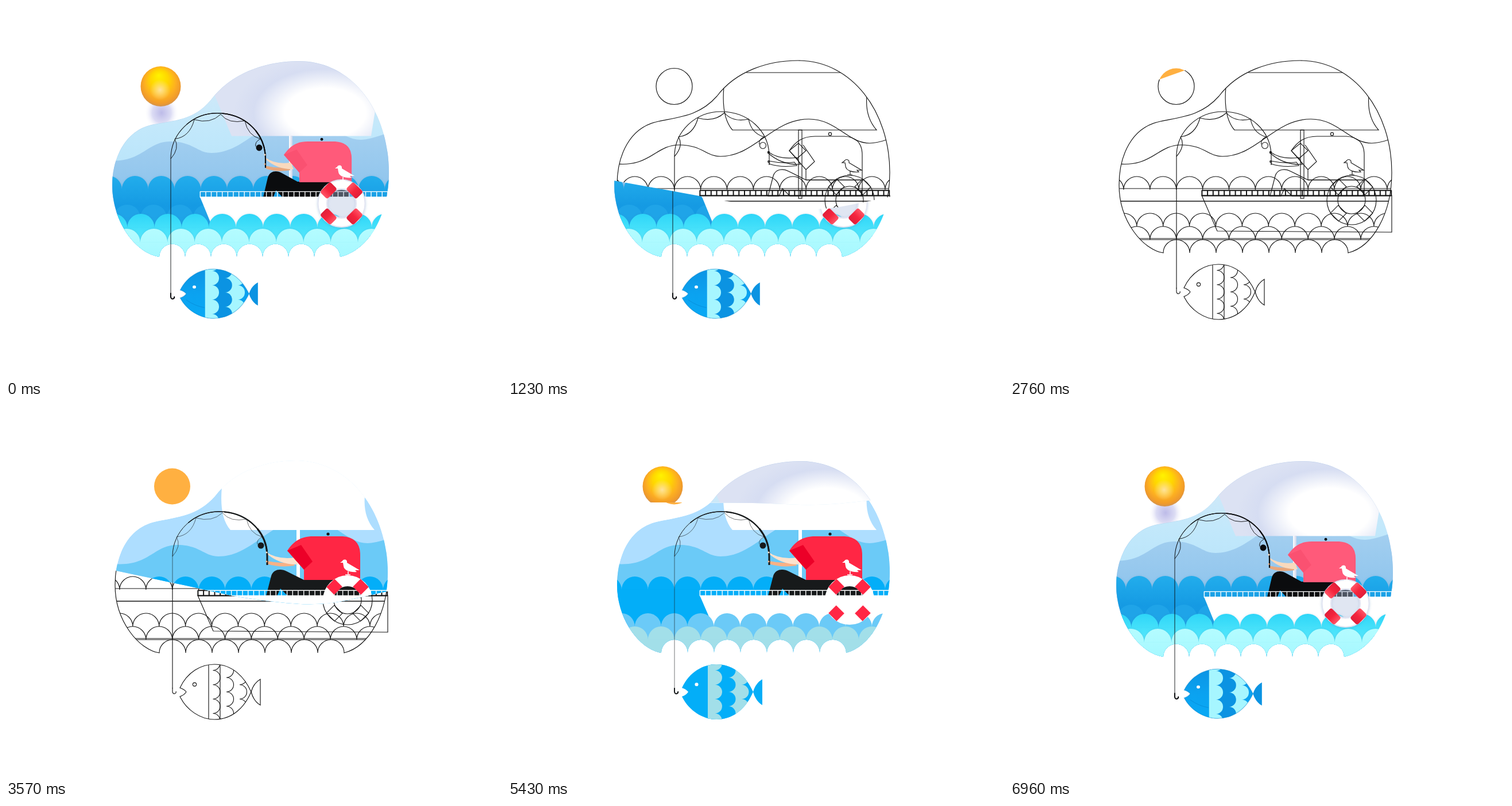
These frames come from a looping animation (864x648 px, 7200 ms). An HTML page:

```html
<!DOCTYPE html>
<html lang="en">
<head>
<meta charset="utf-8">
<title>Fishing trip</title>
<style>
  html, body { margin: 0; width: 100%; height: 100%; overflow: hidden; background: #fff; }
  svg { display: block; width: 864px; height: 648px; }
  .sketch { display: none; }
  .line * { fill: none; stroke: #151515; stroke-width: 1.15; stroke-dasharray: none; }
  .line .solid { display: none; }
  .line .sketch { display: inline; }
  .line .rail { stroke-width: 2; }
</style>
</head>
<body>
<svg id="stage" viewBox="0 0 864 648" xmlns="http://www.w3.org/2000/svg"></svg>
<script>
const LOOP = 7200;
const path = (d, fill, extra = '') => `<path d="${d}" fill="${fill}" ${extra}/>`;
const stroke = (d, color, width, extra = '') =>
  path(d, 'none', `stroke="${color}" stroke-width="${width}" ${extra}`);
const circle = (x, y, r, fill, extra = '') =>
  `<circle cx="${x}" cy="${y}" r="${r}" fill="${fill}" ${extra}/>`;
const group = (content, extra = '') => `<g ${extra}>${content}</g>`;
const matrix = m => m ? `transform="matrix(${m})"` : '';
const repeat = (n, f) => Array.from({ length: n }, (_, i) => f(i)).join('');
const gradient = (id, stops, attrs = 'x1="0" y1="0" x2="0" y2="1"', kind = 'linear') =>
  `<${kind}Gradient id="${id}" ${attrs}>` +
  stops.map(([at, color]) => `<stop offset="${at}" stop-color="${color}"/>`).join('') +
  `</${kind}Gradient>`;
const between = (y1, y2) => `gradientUnits="userSpaceOnUse" x1="0" y1="${y1}" x2="0" y2="${y2}"`;

const flat = {
  id: 'flat',
  blob: 'M267,430C232,425 190,375 190,312C190,260 212,211 262,201C300,193 334,191 364,157' +
    'C398,112 455,95 505,95C600,95 665,185 665,290C665,362 632,419 589,430' + 'a23,23 0 0 0 -46,0'.repeat(7) + 'Z',
  sky: '#aedeff', haze: '#6bcaf7',
  rows: [[152, 45.9, 297, '#03aef8'], [129, 45.9, 361, '#6bcaf7'], [152, 45.9, 384, '#a2dfe9']],
  sail: 'M376,141C373,175 377,200 391,216H642C628,200 623,180 625,157V80H376Z',
  sailFill: '#fff', mast: [506, 216, 6, 119, '#fff'],
  sun: [289.5, 140, 31.5, '#ffb041'],
  shirt: '#ff2644', sleeve: '#ec0028', ink: '#171a1b', skin: '#fde2cd', skinDark: '#f9b185',
  buoy: [595, 338, 43, 24, 20, '#ff2644'],
  fish: '#03aef8', fishScale: '#03aef8', paleScale: '#a2dfe9',
  rodWidth: 2.9, threadWidth: .6,
  at: {}
};

const depth = {
  id: 'depth',
  blob: 'M267,437C225,430 185,375 185,312C185,262 210,214 258,206C302,198 332,197 362,157' +
    'C400,112 460,96 510,96C605,96 667,185 667,290C667,365 632,425 582,437' + 'a22.5,22.5 0 0 0 -45,0'.repeat(7) + 'Z',
  sky: 'url(#air)', haze: 'url(#mist)',
  rows: [[156, 45.8, 296, 'url(#deep)'], [164, 47.3, 362, 'url(#mid)'], [139, 47.4, 388, 'url(#foam)']],
  sail: 'M362,152L393,226.5H636L644,176V80H362Z',
  sailFill: 'url(#cloth)', mast: [493, 226, 6, 102, 'url(#pole)'],
  sun: [269.5, 140, 35, 'url(#ball)'],
  shirt: '#ff5a7a', sleeve: '#fa5171', ink: '#0b0c0e', skin: '#f9d9bd', skinDark: '#e9a77c',
  buoy: [584.5, 344, 42, 24, 25, 'url(#band)'],
  fish: 'url(#fin)', fishScale: '#0b93e2', paleScale: '#a6f6ff',
  rodWidth: 2.2, threadWidth: .9,
  soft: 'style="filter:drop-shadow(0 1px 2px #3a78b044)"',
  at: {
    haze: '1 0 0 1 -12 -6', body: '.93 0 0 .934 28.3 24', legs: '.909 0 0 1 36 3',
    arms: '.9 0 0 .95 43 22', rod: '1 0 0 1.02 -3 -1', boat: '.99 0 0 1.05 7.3 -14',
    bird: '1 0 0 1 -9 10', fish: '.968 0 0 .896 10 55', scales: '1 0 0 1.116 0 -60.3'
  }
};

const defs = gradient('air', [[0, '#d8e9f7'], [.35, '#c2e8fb'], [1, '#a5dcf9']]) +
  gradient('mist', [[0, '#a9d2f1'], [1, '#8cc3ec']]) +
  gradient('deep', [[0, '#22adec'], [.5, '#159ae3'], [1, '#1a9ce4']], between(296, 400)) +
  gradient('mid', [[0, '#2ed6f8'], [1, '#5aeafc']], between(362, 410)) +
  gradient('foam', [[0, '#b4fcff'], [1, '#a6f8ff']], between(388, 436)) +
  gradient('pole', [[0, '#fff'], [1, '#ccd4ea']], '') +
  gradient('band', [[0, '#ff5567'], [.5, '#f5253d'], [1, '#e01f3a']]) +
  gradient('fin', [[0, '#0b94e4'], [.5, '#0ba2f0'], [1, '#08a9f5']]) +
  gradient('cloth', [[0, '#fff'], [.44, '#fff'], [.78, '#d6ddf2'], [1, '#dce2f3']],
    'gradientUnits="userSpaceOnUse" cx="0" cy="0" r="1" gradientTransform="translate(556 186) scale(160 98)"', 'radial') +
  gradient('ball', [[0, '#fff200'], [.4, '#ffd600'], [.7, '#fdb020'], [.9, '#f09a2b'], [1, '#cf9353']],
    'cx=".5" cy=".46" r=".55" fx=".45" fy=".22"', 'radial') +
  gradient('glow', [[0, '#ffe29c'], [1, '#ffe29c00']], '', 'radial') +
  gradient('shade', [[0, '#bdbbe8'], [.55, '#dcdcf4'], [1, '#ffffff00']], '', 'radial');

function waveRow([x, pitch, top, fill]) {
  const r = pitch / 2;
  return path(`M${x},${top + r}` + `a${r},${r} 0 0 1 ${pitch},0`.repeat(12), fill) +
    `<rect class="solid" x="${x}" y="${top + r - .5}" width="${pitch * 12}" height="120" fill="${fill}"/>`;
}

function sun(g) {
  const [x, y, r, fill] = g.sun;
  const ball = circle(x, y, r, fill);
  if (g !== depth) return ball;
  return '<ellipse cx="271" cy="186" rx="30" ry="32" fill="url(#shade)"/>' + ball +
    circle(x - 1, y + 6, 18, 'url(#glow)');
}

function angler(g) {
  const legs = path('M453,331L462,296C466,283 480,283 489,288L519,303H617V331H491L478,318L472,331Z', g.ink);
  const body = path('M519,303V285L490,252C501,236 513,227 535,227H586Q617,229 617,259V303Z', g.shirt) +
    path('M490,252L514,242L534,271L519,285Z', g.sleeve, 'class="solid"') +
    path('M506,239L490,252L503,266L519,252ZM514,242L534,271L519,285', 'none', 'class="sketch"') +
    circle(561, 223, 2.6, g.ink);
  const arms = path('M455,270Q478,275 499,272L503,278Q476,282 455,275Z', g.skinDark) +
    path('M453,254Q472,268 503,264L509,276Q476,277 453,256Z', g.skin);
  return group(legs, matrix(g.at.legs)) + group(arms, matrix(g.at.arms)) + group(body, matrix(g.at.body));
}

function rod(g) {
  const bend = 'M290,262C290,219 326,184 371,184C419,184 455,218 455,262V277';
  const taper = (from, share) => stroke(bend, g.ink, g.rodWidth * share,
    `class="solid" pathLength="100" stroke-dasharray="0 ${from} 100"`);
  const loops = 'M290,262Q306,244 297,228Q323,225 331,195Q359,203 377,186Q391,203 419,197Q424,222 446,228Q436,233 438,241';
  return group(stroke(bend, g.ink, 1) + taper(25, .55) + taper(50, .77) + taper(75, 1) +
    stroke(loops, g.ink, g.threadWidth) + stroke('M290,262V492', g.ink, g.threadWidth) +
    stroke('M290,491V498Q291,502 294,501Q297,500 296,497', g.ink, 2) +
    circle(444, 243, 5.5, g.ink) +
    circle(454, 255, 1.6, g.skin) + circle(454, 271, 1.4, g.skinDark), matrix(g.at.rod));
}

function boat(g) {
  const rail = 'M334,321.3H664.5M334,330.5H664.5' + repeat(35, i => `M${334.4 + i * 9.7},321V331`);
  return group(path('M334,330H665V394L361,392Z', '#fff') +
    stroke(rail, '#fff', 1.4, 'class="rail"'), matrix(g.at.boat));
}

function buoy(g) {
  const [x, y, outer, inner, band, fill] = g.buoy;
  const width = outer - inner;
  const ring = circle(0, 0, (outer + inner) / 2, 'none', `class="solid" stroke="#fff" stroke-width="${width}"`);
  const bands = repeat(4, i => `<rect x="${inner - 1}" y="${-band / 2}" width="${width}" height="${band}"
    rx="${g === depth ? 4 : 0}" fill="${fill}" transform="rotate(${45 + 90 * i})"/>`);
  const rims = circle(0, 0, outer, 'none', 'class="sketch"') + circle(0, 0, inner, 'none', 'class="sketch"');
  const hole = g === depth ? circle(0, 0, inner, '#c9cde8', 'fill-opacity=".35"') : '';
  const edge = g === depth
    ? circle(0, 0, inner + 1, 'none', 'stroke="#c6cce6" stroke-width="3" stroke-opacity=".5"') +
      circle(0, 0, outer - 1, 'none', 'stroke="#c6cce6" stroke-width="2" stroke-opacity=".5"') : '';
  return group(hole + ring + edge + bands + rims, `transform="translate(${x} ${y})" ${g.soft || ''}`);
}

const bird = g => group(
  path('M582,273L586,270C588,266 595,267 594,273L616,286L608,286L611,289C600,290 589,287 588,279L587,273Z', '#fff') +
  stroke('M596,288V294M591,294H600', '#fff', 1.5), matrix(g.at.bird));

const fishOutline = 'M303,491C316,463 340,450 363,450C395,450 416,473 427,498C416,524 395,546 363,546' +
  'C338,546 314,529 303,506Q310,504 314,498Q310,493 303,491Z';

function fish(g) {
  const column = (x, y, fill) => path(`M348,${y}H${x}` + 'a12.5,12.5 0 0 1 0,25'.repeat(5) + 'H348', fill);
  const scales = column(407, 435.5, g.paleScale) + column(384, 423, g.fishScale) + column(360.5, 435.5, g.paleScale);
  const rim = g === depth ? stroke('M314,510Q330,522 347,525', '#0785d0', .7) +
    stroke(fishOutline, '#0878bd', 1.5, 'stroke-opacity=".3"') : '';
  return group(path(fishOutline, g.fish) +
    group(group(scales, matrix(g.at.scales)), 'clip-path="url(#fishClip)"') +
    path('M353,451V545M373,451V545', 'none', 'class="sketch"') +
    path('M427,498C430,487 436,480 443,476V521C436,517 430,509 427,498Z', g.fishScale) +
    circle(328.5, 485, 3.1, '#fff') + rim, matrix(g.at.fish));
}

function scene(g) {
  const [mx, my, mw, mh, mFill] = g.mast;
  const inBlob = `clip-path="url(#${g.id}Clip)"`;
  const [back, middle, front] = g.rows.map(waveRow).map(w => group(w, g.soft || ''));
  const haze = 'M180,274C248,284 255,242 298,242C338,242 345,262 370,262C430,262 460,197 524,197C572,197 592,239 630,239Q648,239 690,222';
  const far = path(g.blob, g.sky, 'class="solid"') +
    group(path(haze + 'V340H170Z', g.haze), matrix(g.at.haze)) + back +
    path('M180,318H680M180,340H680M180,405H680M180,407H680', 'none', 'class="sketch"');
  const lowRow = g === depth ? waveRow([188, 46, 346, '#1fa4e8']) : '';
  const sail = path(g.sail, g.sailFill, 'class="solid"') +
    path('M415,116H582M376,141C373,175 377,200 391,216H642C628,200 623,180 625,157', 'none', 'class="sketch"');
  const rim = g === depth ? stroke(g.blob, '#8fb3dc', 1, 'stroke-opacity=".35"') : '';
  return sun(g) + group(far + lowRow + sail + rim, inBlob) +
    `<rect x="${mx}" y="${my}" width="${mw}" height="${mh}" fill="${mFill}"/>` +
    angler(g) + boat(g) + group(middle + front, inBlob) + buoy(g) + bird(g) +
    path(g.blob, 'none', 'class="sketch"') + rod(g) + fish(g);
}

const wipes = [
  { layer: 'line', start: 240, clock: p => p < 600 ? -45 + p * .775 : p - 180 },
  { layer: 'flat', start: 2760, clock: p => p - 45 },
  { layer: 'depth', start: 5190, clock: p => p - 30 }
];
const paper = '<rect width="864" height="648" fill="#fff"/>';
const clip = (id, d) => `<clipPath id="${id}"><path d="${d}"/></clipPath>`;
const layer = (name, content) => group(paper + content, `clip-path="url(#wipe-${name})"`);

document.getElementById('stage').innerHTML =
  `<defs>${defs}${clip('flatClip', flat.blob)}${clip('depthClip', depth.blob)}${clip('fishClip', fishOutline)}` +
  wipes.map(w => `<clipPath id="wipe-${w.layer}"><path id="edge-${w.layer}"/></clipPath>`).join('') + '</defs>' +
  group(paper + scene(depth), 'id="depthScene"') +
  layer('line', group(scene(flat), 'class="line"')) +
  layer('flat', scene(flat)) +
  layer('depth', '<use href="#depthScene"/>');

// Height of the liquid edge at five evenly spaced columns, over time.
const columnX = i => 184 + i * 121;
const edgeKeys = [
  [-45, [156, 112, 72, 55, 55]],
  [420, [178, 214, 249, 268, 247]],
  [750, [279, 306, 332, 342, 319]],
  [1230, [478, 463, 447, 431, 422]],
  [1620, [612, 577, 546, 530, 522]]
];

function edgePath(u) {
  if (u > 1620) return 'M0,0H864V648H0Z';
  const next = Math.max(1, edgeKeys.findIndex(([at]) => at >= u));
  const [t0, a] = edgeKeys[next - 1], [t1, b] = edgeKeys[next];
  const ys = a.map((y, i) => y + (b[i] - y) * (u - t0) / (t1 - t0));
  const slope = i => {
    const lo = Math.max(0, i - 1), hi = Math.min(4, i + 1);
    return (ys[hi] - ys[lo]) / (hi - lo) / 3;
  };
  let d = `M0,0V${ys[0]}H${columnX(0)}`;
  for (let i = 0; i < 4; i++) {
    d += `C${columnX(i + 1 / 3)},${ys[i] + slope(i)} ${columnX(i + 2 / 3)},${ys[i + 1] - slope(i + 1)} ${columnX(i + 1)},${ys[i + 1]}`;
  }
  return d + 'H864V0Z';
}

function draw(time) {
  const t = Math.floor((time % LOOP) / 30) * 30;
  for (const { layer, start, clock } of wipes) {
    const d = t < start ? 'M0,0Z' : edgePath(clock(t - start));
    document.getElementById('edge-' + layer).setAttribute('d', d);
  }
}

function tick() {
  draw(performance.now());
  requestAnimationFrame(tick);
}
tick();
</script>
</body>
</html>
```
